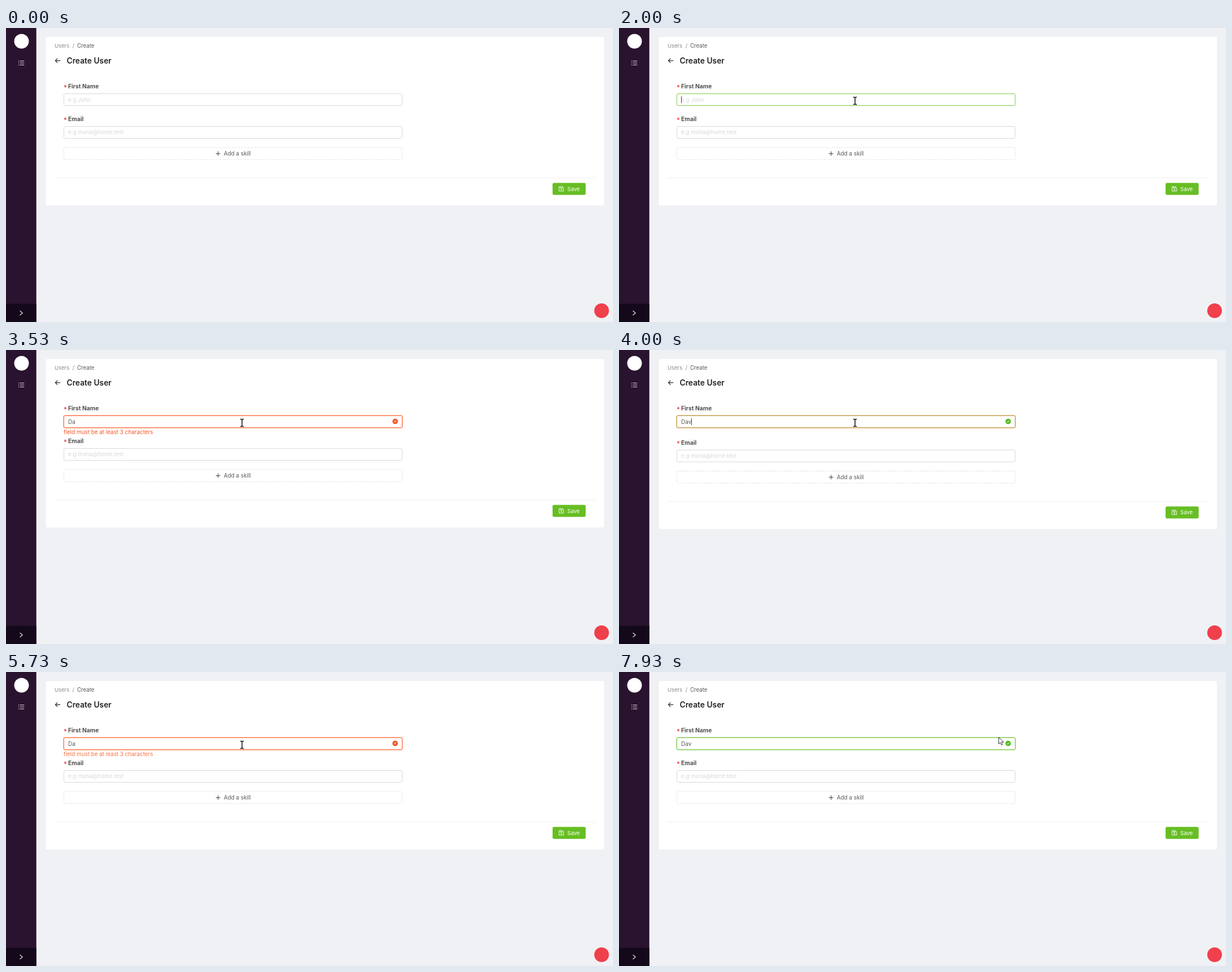
Animation, 1075 px wide and 521 px high, one loop 8000 ms. Source, as an HTML page:

```html
<!DOCTYPE html>
<html lang="en">
<head>
<meta charset="utf-8">
<title>Create User</title>
<style>
  html, body { margin: 0; width: 100%; height: 100%; overflow: hidden; background: #f0f1f5; }
  svg { display: block; width: 100vw; height: 100vh; }
  text { font: 9.9px Inter, "Open Sans", sans-serif; fill: #595959; white-space: pre; }
  .label { font-size: 10.3px; font-weight: 700; fill: #505050; }
  .hint { font-size: 9.8px; fill: #d8d8d8; }
  .box { fill: #fff; stroke: #d9d9d9; }
  .line { fill: none; stroke-linecap: round; stroke-linejoin: round; }
</style>
</head>
<body>
<svg viewBox="0 0 1075 521" preserveAspectRatio="none">
  <rect width="1075" height="521" fill="#f0f1f5"/>
  <rect width="53.7" height="521" fill="#2a132e"/>
  <rect y="488.7" width="53.7" height="32.3" fill="#14091a"/>
  <circle cx="27.5" cy="23.5" r="13" fill="#fff"/>
  <g class="line" stroke="#e6e2e7">
    <path d="M25 58.5h6.8M25 62h6.8M25 65.5h6.8"/>
    <path d="M22.5 58.5h.1M22.5 62h.1M22.5 65.5h.1" stroke-width="1.3"/>
    <path d="M25 501.5l4.2 3.5-4.2 3.5" stroke-width="1.2"/>
  </g>

  <rect id="card" x="70.5" y="16" width="988.5" height="298.5" rx="2.5" fill="#fff"/>
  <text x="86" y="35" style="font-size:9.5px;fill:#8c8c8c">Users</text>
  <text x="117.5" y="35" style="fill:#8c8c8c">/</text>
  <text x="126" y="35" style="font-size:9.7px">Create</text>
  <path class="line" d="M95.7 57.8H87.5M91 54.2l-3.6 3.6 3.6 3.6" stroke="#262626" stroke-width="1.2"/>
  <text x="107.5" y="62.7" style="font-size:13.8px;font-weight:600;fill:#222">Create User</text>

  <path class="line" d="M105 101.2v3.8M103.4 102.1l3.2 2M106.6 102.1l-3.2 2" stroke="#f5333f"/>
  <text class="label" x="110" y="107">First Name</text>
  <rect id="ring" x="101.8" y="115.8" width="600.4" height="22.4" rx="3" fill="none" stroke-width="1.5"/>
  <rect id="nameBox" class="box" x="102.5" y="116.5" width="599" height="21" rx="2.2"/>
  <text id="nameHint" class="hint" x="110" y="130.6">e.g John</text>
  <text id="typed" x="110" y="130.6" style="font-size:10px"></text>
  <rect id="caret" y="121" width="1" height="12" fill="#444"/>
  <g id="icon">
    <circle id="iconDisc" r="4.8"/>
    <path id="iconMark" class="line" stroke="#fff"/>
  </g>
  <text id="message" x="102" y="149" style="fill:#fa5420">field must be at least 3 characters</text>

  <g id="lower">
    <path class="line" d="M105 158.9v3.8M103.4 159.8l3.2 2M106.6 159.8l-3.2 2" stroke="#f5333f"/>
    <text class="label" x="110" y="164.8">Email</text>
    <rect id="mailBox" class="box" x="102.5" y="174.5" width="599" height="21" rx="2.2"/>
    <text class="hint" x="110" y="188.4">e.g mona@home.test</text>
    <rect id="addBox" x="102.5" y="211.8" width="599" height="21.4" rx="2.2" fill="#fff" stroke-dasharray="2 2"/>
    <path id="plus" class="line" d="M372.2 222.6h6.8M375.6 219.2v6.8" stroke-width="1.2"/>
    <text id="addText" x="385.7" y="226.1">Add a skill</text>
    <path d="M86 265.7H1043.5" stroke="#f0f0f0"/>
    <rect x="968" y="274.5" width="58.6" height="21.3" rx="2.7" fill="#67be23"/>
    <path class="line" d="M979.8 281.2h5.8l2 2v5.8h-7.8zM981.8 281.4v2.2h3.4v-2.2" stroke="#fff" stroke-width=".9"/>
    <circle cx="983.7" cy="286.2" r="1.2" fill="none" stroke="#fff" stroke-width=".8"/>
    <text x="994" y="288.7" style="font-size:9.6px;fill:#fff">Save</text>
  </g>

  <circle cx="1054.8" cy="501" r="13" fill="#f0404c"/>
  <path id="arrow" d="M0 0V12L2.8 9.5 4.8 14 6.8 13.1 4.9 8.7H8.5Z" fill="#fff" stroke="#222" stroke-width=".9"/>
  <path id="beam" class="line" d="M-2.6-6.5Q0-6.5 0-5.2 0-6.5 2.6-6.5M0-5.2V5.2M-2.6 6.5Q0 6.5 0 5.2 0 6.5 2.6 6.5" stroke="#111" stroke-width="1.5"/>
</svg>
<script>
const LOOP = 8000;
const el = {};
document.querySelectorAll('[id]').forEach(n => el[n.id] = n);

const GREEN = [127, 203, 72], ORANGE = [255, 112, 67], GREY = [217, 217, 217], INK = [89, 89, 89];
const clamp = v => Math.max(0, Math.min(1, v));
const ramp = (t, a, b) => clamp((t - a) / (b - a));
const within = (t, spans) => spans.some(([a, b]) => t >= a && t < b);
const rgb = (a, b, k, alpha = 1) =>
  `rgba(${a.map((v, i) => Math.round(v + (b[i] - v) * k))},${alpha})`;
const set = (node, attrs) => { for (const k in attrs) node.setAttribute(k, attrs[k]); };
const at = (x, y) => `translate(${x} ${y})`;
const show = (node, on) => node.setAttribute('visibility', on ? 'visible' : 'hidden');

const typing = [[0, ''], [2870, 'D'], [3200, 'Da'], [3870, 'Dav'], [5400, 'Da'], [6200, 'Dav']];
const caretOff = [[0, 2000], [2530, 3060], [3530, 3870], [4600, 5130], [5660, 6190], [6720, 7250], [7780, 8000]];
const invalid = [[2870, 3870], [5400, 6330]];
const path = [
  [70, 1066, 508], [200, 812, 427], [530, 812, 427], [1330, 440, 140], [1470, 418, 129],
  [6940, 418, 129], [7300, 505, 148], [7780, 671, 122], [7920, 671, 122], [7930, 672.5, 115.5]
];

function pointer(t) {
  const i = path.findIndex(p => p[0] > t);
  if (i < 0) return path[path.length - 1].slice(1);
  if (i === 0) return path[0].slice(1);
  const [a, b] = [path[i - 1], path[i]];
  const k = ramp(t, a[0], b[0]);
  return [a[1] + (b[1] - a[1]) * k, a[2] + (b[2] - a[2]) * k];
}

// A short hover that fades in and back out.
function hover(t, enter, leave) {
  const peak = Math.sqrt(ramp(leave, enter, enter + 300));
  return t < leave ? Math.sqrt(ramp(t, enter, enter + 300)) : peak * (1 - ramp(t, leave, leave + 300));
}

// cubic-bezier(.645, .045, .355, 1)
function easeInOut(x) {
  let lo = 0, hi = 1;
  const curve = (s, a, b) => 3 * a * s * (1 - s) ** 2 + 3 * b * s * s * (1 - s) + s ** 3;
  for (let i = 0; i < 18; i++) {
    const mid = (lo + hi) / 2;
    if (curve(mid, .645, .355) < x) lo = mid; else hi = mid;
  }
  return curve(lo, .045, 1);
}

// The margin grows linearly while the message height eases away.
function layoutShift(t) {
  let u = 0;
  if (t >= 3940 && t < 5000) u = (t - 3940) / 300;
  if (t >= 6330) u = .13 + Math.max(0, t - 6482) / 300;
  return 16 * (clamp(u) - easeInOut(clamp(u - .05)));
}

function drawField(t) {
  const value = typing.filter(k => k[0] <= t).pop()[1];
  if (el.typed.textContent !== value) el.typed.textContent = value;
  show(el.nameHint, !value);
  const width = value ? el.typed.getComputedTextLength() : 0;
  el.caret.setAttribute('x', Math.round(110 + width));
  show(el.caret, !within(t, caretOff));

  const error = ramp(t, 2870, 3100) - ramp(t, 3870, 4170) + ramp(t, 5400, 5640) - ramp(t, 6450, 6550);
  const focus = ramp(t, 2000, 2270);
  const lit = ramp(t, 1380, 1670);
  el.nameBox.setAttribute('stroke', '');
  el.nameBox.style.stroke = lit < 1 ? rgb(GREY, GREEN, lit) : rgb(GREEN, ORANGE, error);
  el.ring.setAttribute('stroke', rgb(GREEN, ORANGE, error, .45 * focus));

  const bad = within(t, invalid);
  const changed = [2870, 3870, 5400, 6330].filter(k => k <= t).pop();
  show(el.icon, t >= 2870);
  const size = changed ? .4 + .6 * ramp(t, changed, changed + 100) : 1;
  el.icon.setAttribute('transform', `${at(689.2, 126.5)} scale(${size})`);
  el.iconDisc.setAttribute('fill', bad ? '#f4511e' : '#4fbd1d');
  el.iconMark.setAttribute('d', bad ? 'M-1.4-1.4l2.8 2.8M1.4-1.4l-2.8 2.8' : 'M-2 .1l1.4 1.5L2-1.5');

  const seen = ramp(t, 3000, 3270) - ramp(t, 3870, 3970) + ramp(t, 5480, 5780) - ramp(t, 6200, 6330);
  set(el.message, { opacity: seen, transform: at(0, -3 * (1 - seen)) });
}

function drawRest(t) {
  const dy = layoutShift(t);
  el.lower.setAttribute('transform', at(0, dy));
  el.card.setAttribute('height', 298.5 + dy);

  const add = hover(t, 1070, 1135);
  const ink = rgb(INK, GREEN, add);
  el.addBox.setAttribute('stroke', rgb(GREY, GREEN, add));
  el.plus.setAttribute('stroke', ink);
  el.addText.style.fill = ink;
  el.mailBox.style.stroke = rgb(GREY, GREEN, hover(t, 1177, 1235));
}

function drawPointer(t) {
  const [x, y] = pointer(t);
  const inField = x > 102 && x < 702 && (y > 117 && y < 138 || y > 174 && y < 195);
  show(el.arrow, t >= 70 && !inField);
  show(el.beam, inField);
  el.arrow.setAttribute('transform', at(x, y));
  el.beam.setAttribute('transform', at(x, y));
}

function draw(t) {
  drawField(t);
  drawRest(t);
  drawPointer(t);
}

const start = performance.now();
function tick() {
  draw((performance.now() - start) % LOOP);
  requestAnimationFrame(tick);
}
tick();
</script>
</body>
</html>
```
